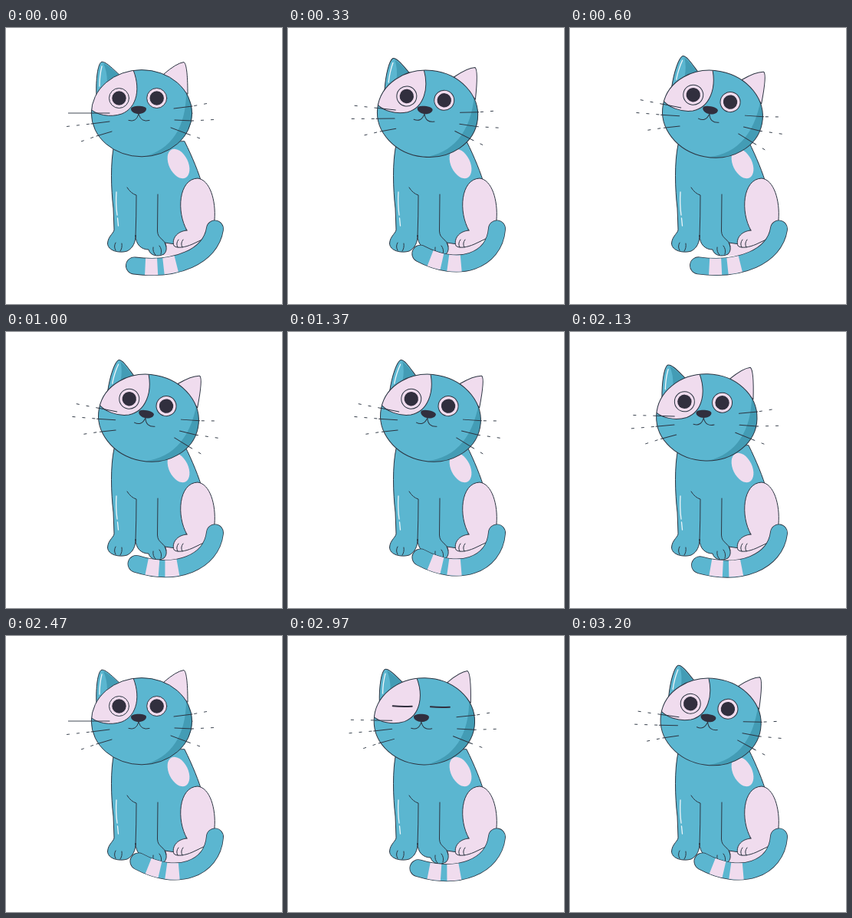
These frames come from a looping animation (360x360 px, 3.23 s). An HTML page:

```html
<!DOCTYPE html>
<html lang="en">
<head>
<meta charset="utf-8">
<title>Sitting cat</title>
<style>
html, body { margin: 0; width: 100%; height: 100%; overflow: hidden; background: #fff; }
svg { display: block; width: 360px; height: 360px; }
g, path { stroke-linejoin: round; stroke-linecap: round; }
.b { fill: #5bb6d0; } .p { fill: #f0dcee; } .s { fill: #439cb5; } .d { fill: #312f3e; }
.l { stroke: #2c3542; stroke-width: 1; }
.n { fill: none; }
.w { fill: none; stroke: #eef6fa; stroke-width: 1.3; }
.o { fill: none; stroke: #2c3542; stroke-width: .9; stroke-dasharray: 4 9; stroke-linecap: butt; }
.t { fill: none; }
</style>
</head>
<body>
<svg viewBox="0 0 360 360">
  <defs><clipPath id="skull"><ellipse cx="177" cy="111.200" rx="65.700" ry="56.600"/></clipPath></defs>

  <path class="p" d="M204 278L246 270L256 284Q236 300 205 297Z"/>
  <path class="b l" d="M141 152C136 175 137 210 140 235L141 262C142 267 133 271 132.500 281C133 291 148 294 158 291C166 287 169 279 169 270C169 283 177 289 186 289C188 297 198 299 206 295C211 290 209 284 207 280L228 283L256 205C252 190 243 168 233 148Z"/>
  <ellipse class="p" cx="225" cy="177" rx="12.500" ry="20.500" transform="rotate(-26 225 177)"/>
  <path class="l n" d="M158 208Q163 216 170 218Q170 245 169 272M198 217L197.500 265C198 276 208 275 209 285M143 280Q140 285 143 290M151 281Q152 287 149 291M192 286Q191 292 195 296M200 284Q204 289 202 295"/>
  <path class="w" d="M144 214Q143 230 145 244M145.500 248L146.500 258"/>
  <path class="p l" d="M236 264C222 240 225 197 250 196C266 198 274 225 272 250L262 273L243 282C234 286 223 288 219 284C216 276 222 265 236 264"/>
  <path class="l n" d="M225 276Q221 281 224 286M231 276Q227 281 230 286"/>

  <g id="tail">
    <path class="t" stroke="#2c3542" stroke-width="23"/>
    <path class="t" stroke="#5bb6d0" stroke-width="21.400"/>
    <path class="t" stroke="#f0dcee" stroke-width="21.400" stroke-dasharray="0 14 16 8 17 999" style="stroke-linecap:butt"/>
  </g>

  <g id="head">
    <path class="b l" d="M118 88C117 65 120 48 124 44.500C129 42 140 54 149 62Z"/>
    <path class="s" d="M127 46C132 48 141 56 148 62L132 71Q132 57 127 46Z"/>
    <path class="w" d="M125 50Q122 62 122 76"/>
    <path class="p l" d="M206 60Q222 46 232 44.500C236 47 237 66 237 86Z"/>
    <ellipse class="b" cx="177" cy="111.200" rx="65.700" ry="56.600"/>
    <g clip-path="url(#skull)">
      <path class="s" d="M176 169C215 160 236 130 235 80L250 82V172Z"/>
      <path class="p l" d="M164 50C177 78 171 104 151 112C136 117 118 114 108 104V50Z"/>
    </g>
    <ellipse class="n l" cx="177" cy="111.200" rx="65.700" ry="56.600"/>
    <g id="eyes"></g>
    <path class="d" d="M163 105.500C163 100.500 183 100.500 183 105.500C183 109.500 178 112 173 112C168 112 163 109.500 163 105.500Z"/>
    <path class="l n" d="M160 120.500Q170 123.500 173 112Q176 123.500 187 120.500"/>
    <path class="l n" d="M135 111H112M135 122L111 125M138 135L118 141M219 105L243 102M220 120L243 121M215 130L239 139"/>
    <path class="o" id="long" d="M81 111H112"/>
    <path class="o" d="M79 128.500L111 125M98 148L118 141M262 98.500L243 102M271 119.500L243 121M253 144L239 139"/>
  </g>
</svg>
<script>
const LOOP = 3230;
const $ = id => document.getElementById(id);
const tails = document.querySelectorAll('#tail path');

$('eyes').innerHTML = [147.5, 196.7].map(x => `
  <g class="open" data-x="${x}"><circle class="p l" r="13"/><circle class="d" r="9.200"/></g>
  <path class="shut n" stroke="#312f3e" stroke-width="2" d="M${x - 12} 92Q${x} 93 ${x + 13} 92"/>`).join('');
const open = document.querySelectorAll('.open'), shut = document.querySelectorAll('.shut');

const clamp = u => Math.max(0, Math.min(1, u));
const ease = u => (1 - Math.cos(Math.PI * clamp(u))) / 2;
const ramp = (t, start, span = 500) => ease((t - start) / span);

// Times at which the tail is alternately lowest and highest
const swings = [0, 300, 620, 870, 1120, 1370, 1880, 2470, 2760, 3210, 3600];
function tailLift(t) {
  const i = swings.findIndex(s => s > t) - 1;
  const u = ramp(t, swings[i], swings[i + 1] - swings[i]);
  return i % 2 ? 1 - u : u;
}

const lidGap = (t, mid) => clamp((Math.abs(t - mid) - 45) / 60);

function draw(t) {
  const k = ramp(t, 60) - ramp(t, 1755) + ramp(t, 2870);
  $('head').setAttribute('transform', `translate(${9 * k} ${k}) rotate(${11 * k} 177 111)`);
  $('long').style.strokeDasharray = k < .01 ? 'none' : '4 9';

  const gap = Math.min(lidGap(t, 170), lidGap(t, 2970));
  open.forEach(e => {
    e.setAttribute('transform', `translate(${e.dataset.x} 91.500) scale(1 ${gap})`);
    e.style.display = gap > .1 ? '' : 'none';
  });
  shut.forEach(e => e.style.display = gap > .1 ? 'none' : '');

  const v = tailLift(t), mix = (a, b) => a + (b - a) * v;
  const d = `M${mix(167.5, 173)} ${mix(310, 294)}C${mix(222, 223)} ${mix(317, 321)} ${mix(267, 269)} ${mix(298, 304)} 272.500 262`;
  tails.forEach(p => p.setAttribute('d', d));
}

let begin;
function frame(now) {
  begin ??= now;
  draw((now - begin) % LOOP);
  requestAnimationFrame(frame);
}
draw(0);
requestAnimationFrame(frame);
</script>
</body>
</html>
```
